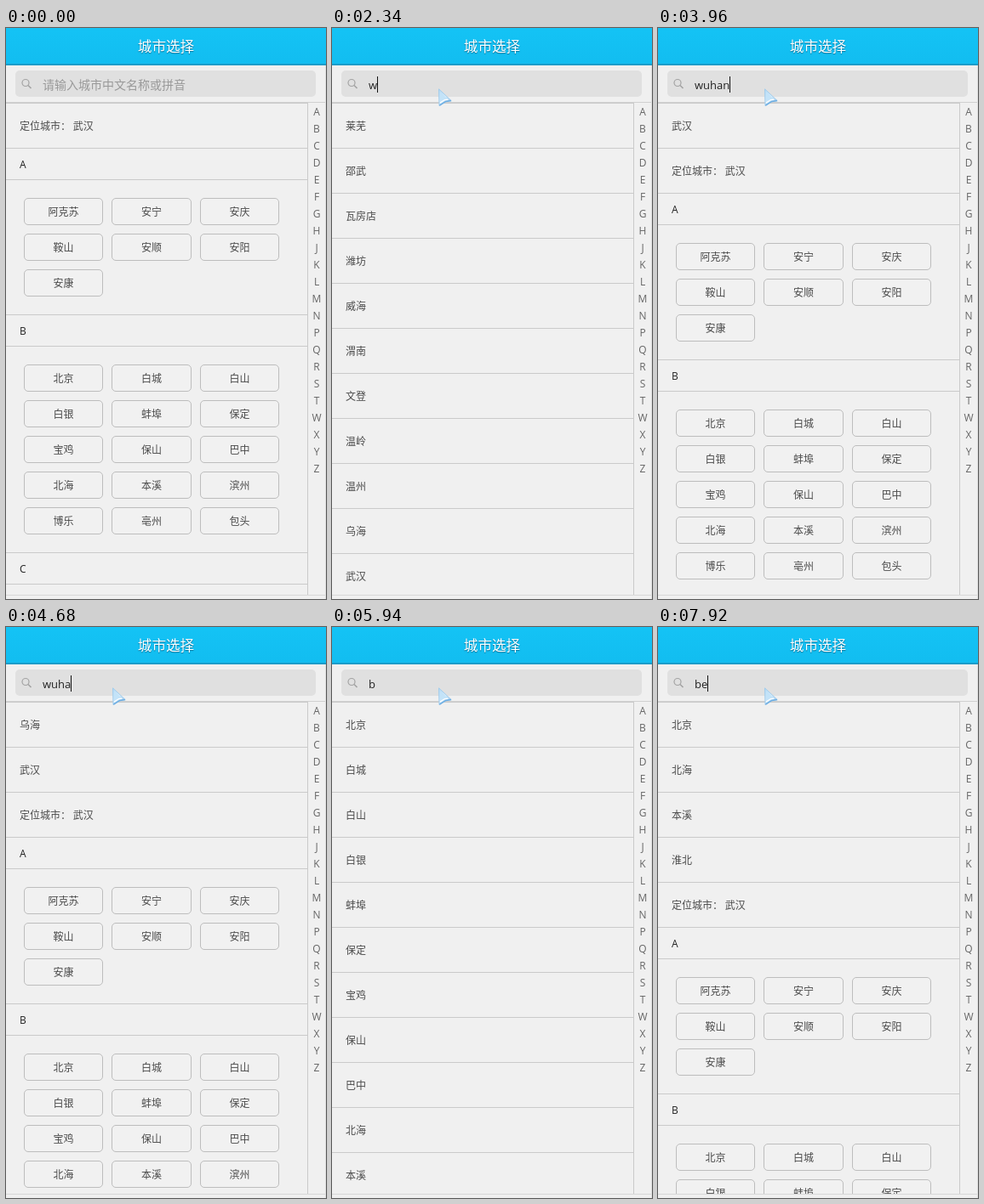
Animation, 376 px wide and 672 px high, one loop 8 s. Source, as an HTML page:

```html
<!DOCTYPE html>
<html lang="zh-CN">
<head>
<meta charset="utf-8">
<title>城市选择</title>
<style>
  html, body { margin: 0; width: 100%; height: 100%; overflow: hidden; background: #f0f0f0; }
  svg { display: block; }
  text { font: 12px "Noto Sans CJK SC", "Noto Sans CJK", sans-serif; fill: #4a4a4a; white-space: pre; }
  .mid { text-anchor: middle; }
  .latin { font-family: "Open Sans", "Noto Sans", sans-serif; }
  .head { fill: #222; }
  .index { fill: #666; }
  .title { font-size: 16.6px; fill: #fff; text-shadow: 0 1px 1px rgba(0, 60, 90, .6); }
  .hint { font-size: 14px; fill: #999; }
  .query { font-size: 13px; fill: #222; }
  .line { fill: #cacaca; }
  .button { fill: #f1f1f1; stroke: #bdbdbd; }
</style>
</head>
<body>
<svg width="376" height="672" viewBox="0 0 376 672">
  <defs>
    <clipPath id="page"><rect y="88" width="354" height="579"/></clipPath>
    <linearGradient id="sky" x2="0" y2="1">
      <stop stop-color="#14c3f5"/><stop offset="1" stop-color="#12bdf0"/>
    </linearGradient>
    <linearGradient id="ice" x2="1" y2="1">
      <stop stop-color="#b4daf4"/><stop offset=".5" stop-color="#d2ebfb"/><stop offset="1" stop-color="#73b2e6"/>
    </linearGradient>
  </defs>
  <rect width="376" height="672" fill="#f0f0f0"/>
  <rect width="376" height="43" fill="url(#sky)"/>
  <rect y="42" width="376" height="2" fill="#1b9cc9"/>
  <text class="title mid" x="188" y="28">城市选择</text>
  <rect x="11" y="50" width="353" height="31" rx="5" fill="#e0e0e0"/>
  <g fill="none" stroke="#a3a3a3" stroke-width="1.2">
    <circle cx="23" cy="64.5" r="4"/><path d="M26 67.5L29.5 71" stroke-width="1.6"/>
  </g>
  <rect y="87" width="376" height="1" fill="#d0d0d0"/>
  <g id="list" clip-path="url(#page)"></g>
  <rect class="line" x="354" y="88" width="1" height="579"/>
  <rect y="667" width="376" height="1" fill="#d8d8d8"/>
  <rect x="375" y="44" width="1" height="628" fill="#dedede"/>
  <g id="index"></g>
  <text id="hint" class="hint" x="43" y="72">请输入城市中文名称或拼音</text>
  <text id="query" class="query latin" x="43" y="72"></text>
  <rect id="caret" y="57" width="1" height="19" fill="#111"/>
  <g id="pointer">
    <path d="M1.5 .8L16.2 14.6L9.8 15.8L2 20.6Z" fill="url(#ice)" stroke="#a3cdec" stroke-linejoin="round"/>
    <path d="M3 4.5L12.5 13.2L8.4 13.6L3.2 17Z" fill="#c3e3f8"/>
    <path d="M2.4 20L9.6 15.4L16 14.4" fill="none" stroke="#6faee2" stroke-width="1.5"/>
    <path d="M3 17L8.4 13.6L12.5 13.2" fill="none" stroke="#fff" stroke-width="1.2"/>
  </g>
</svg>
<script>
const LOOP = 8000, TICK = 180, ROW = 53, HEAD = 37;
const $ = id => document.getElementById(id);

const sections = [
  ['A', '阿克苏 安宁 安庆 鞍山 安顺 安阳 安康'],
  ['B', '北京 白城 白山 白银 蚌埠 保定 宝鸡 保山 巴中 北海 本溪 滨州 博乐 亳州 包头'],
  ['C', '']
].map(([letter, names]) => [letter, names.split(' ').filter(Boolean)]);

const cities = `北京 beijing,白城 baicheng,白山 baishan,白银 baiyin,蚌埠 bangbu,保定 baoding,宝鸡 baoji,
保山 baoshan,巴中 bazhong,北海 beihai,本溪 benxi,滨州 binzhou,淮北 huaibei,莱芜 laiwu,邵武 shaowu,
瓦房店 wafangdian,潍坊 weifang,威海 weihai,渭南 weinan,文登 wendeng,温岭 wenling,温州 wenzhou,
乌海 wuhai,武汉 wuhan,芜湖 wuhu,吴江 wujiang,乌兰浩特 wulanhaote,乌鲁木齐 wulumuqi,武威 wuwei,
无锡 wuxi,梧州 wuzhou`.split(',').map(entry => entry.trim().split(' '));

// [start ms, query, caret visible]
const steps = [
  [0, '', 0], [1440, '', 1], [1980, '', 0],
  [2340, 'w', 1], [2700, 'wu', 1], [3060, 'wuh', 1], [3600, 'wuha', 1], [3960, 'wuhan', 1], [4320, 'wuhan', 0],
  [4680, 'wuha', 1], [4860, 'wuh', 1], [5040, 'wu', 1], [5220, 'w', 1], [5400, '', 1],
  [5580, 'b', 1], [5940, 'b', 0], [6120, 'be', 1], [6300, 'bei', 1],
  [6660, 'beij', 1], [7020, 'beij', 0], [7380, 'beij', 1], [7920, 'be', 1]
];

const advance = { w: 10.1, u: 8, h: 8, a: 7.2, n: 8, b: 8.3, e: 7.4, i: 3.4, j: 3.4 };
const caretX = query => Math.floor([...query].reduce((x, c) => x + advance[c], 43));

const label = (x, y, text, cls = '') => `<text class="${cls}" x="${x}" y="${y}">${text}</text>`;
const line = y => `<rect class="line" y="${y}" width="354" height="1"/>`;

function button(name, i, top) {
  const col = i % 3, x = [21.5, 124.5, 228.5][col], w = col === 1 ? 93 : 92;
  const y = top + 22.5 + Math.floor(i / 3) * 42;
  return `<rect class="button" x="${x}" y="${y}" width="${w}" height="31" rx="4.5"/>` +
    label(x + w / 2, y + 20, name, 'mid');
}

function listMarkup(query) {
  const found = query ? cities.filter(([, pinyin]) => pinyin.includes(query)) : [];
  const rows = [...found.map(([name]) => name), '定位城市： 武汉'];
  let y = 88, out = line(y);
  for (const row of rows) {
    out += label(16, y + 32, row) + line(y += ROW);
  }
  for (const [letter, names] of sections) {
    out += label(16, y + 23.5, letter, 'head latin') + line(y += HEAD);
    if (!names.length) break;
    out += names.map((name, i) => button(name, i, y)).join('');
    out += line(y += Math.ceil(names.length / 3) * 42 + 33);
  }
  return out;
}

$('index').innerHTML = [...'ABCDEFGHJKLMNPQRSTWXYZ']
  .map((c, i) => label(365, 103 + i * 20, c, 'index latin mid')).join('');

let shown = null;

function render(t) {
  const [, query, caretOn] = steps.findLast(([start]) => start <= t);
  if (query !== shown) {
    shown = query;
    $('list').innerHTML = listMarkup(query);
    $('query').textContent = query;
    $('hint').style.display = query ? 'none' : '';
    $('caret').setAttribute('x', caretX(query));
  }
  $('caret').style.display = caretOn ? '' : 'none';

  const tick = Math.floor(t / TICK);
  const p = Math.min(1, Math.max(0, (tick - 2) / 4));
  const ease = p * p * (3 - 2 * p);
  $('pointer').style.display = tick ? '' : 'none';
  $('pointer').setAttribute('transform',
    `translate(${Math.round(250 - 126 * ease)} ${Math.round(429 - 358 * ease)})`);
}

const begin = performance.now();
function loop() {
  render((performance.now() - begin) % LOOP);
  requestAnimationFrame(loop);
}
loop();
</script>
</body>
</html>
```
